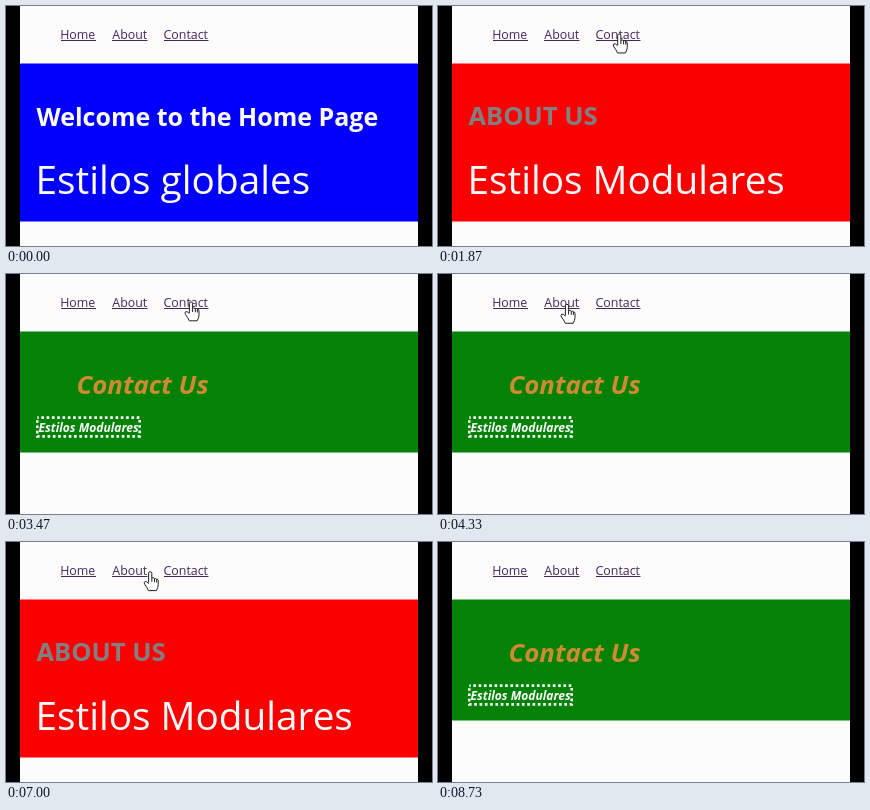
Write an HTML page that moves like this. It is 426 px wide and 240 px high and loops after 8.79 s.

```html
<!DOCTYPE html>
<html lang="en">
<head>
<meta charset="utf-8">
<title>Page styles</title>
<style>
  html, body { margin: 0; width: 100%; height: 100%; overflow: hidden; background: #000; }
  svg { display: block; width: 100vw; height: 100vh; }
  text { font-family: "Open Sans", "Noto Sans", sans-serif; white-space: pre; }
  .nav text { font-size: 12.4px; fill: #46265c; }
  .nav path { stroke: #46265c; }
  .page { visibility: hidden; fill: #fdfdfd; }
  .title { font-size: 25px; font-weight: 700; }
  .lead { font-size: 38.7px; }
  .italic { font-style: italic; font-weight: 700; }
  #home rect { fill: #0000fc; }
  #about rect { fill: #fc0000; }
  #about .title { font-size: 25.5px; fill: #808080; }
  #contact .panel { fill: #048208; }
  #contact .title { font-size: 25.8px; fill: #cf8a32; }
  #contact .note { font-size: 12.05px; }
  #contact .dots { fill: none; stroke: #fdfdfd; stroke-width: 2.6; stroke-dasharray: 2.65; stroke-dashoffset: 1.3; }
</style>
</head>
<body>
<svg viewBox="0 0 426 240">
  <rect width="426" height="240"/>
  <rect x="14" width="398" height="240" fill="#fcfcfd"/>

  <g class="nav">
    <text x="54.2" y="33">Home</text>
    <text x="106.3" y="33">About</text>
    <text x="157.5" y="33">Contact</text>
    <path d="M55 34.5H90M106 34.5H141.5M158 34.5H202.5"/>
  </g>

  <g class="page" id="home">
    <rect x="14" y="57.5" width="398" height="158"/>
    <text class="title" x="30.5" y="120">Welcome to the Home Page</text>
    <text class="lead" x="29.5" y="188">Estilos globales</text>
  </g>

  <g class="page" id="about">
    <rect x="14" y="57.5" width="398" height="158"/>
    <text class="title" x="30.5" y="119.3">ABOUT US</text>
    <text class="lead" x="29.5" y="188">Estilos Modulares</text>
  </g>

  <g class="page" id="contact">
    <rect class="panel" x="14" y="57.5" width="398" height="121"/>
    <text class="title italic" x="70.5" y="119.5">Contact Us</text>
    <rect class="dots" x="31.3" y="143.6" width="102.4" height="18.8"/>
    <text class="note italic" x="32.5" y="157.8">Estilos Modulares</text>
  </g>

  <path id="hand" fill="#fff" stroke="#222" stroke-linejoin="round"
        d="M-1.6 11.5V1.7Q-1.6 .4 0 .4T1.6 1.7V6.7Q3 5.5 4.3 7.3Q5.6 6.4 6.4 8Q8 7.5 8 9.4V13.5Q8 16 6.2 19.3H-1.7Q-3.2 16-5.5 13Q-6.6 11-5.3 10.2T-1.6 12.2M1.6 6.7V10.5M4.3 7.3V10.8M6.4 8V11"/>
</svg>
<script>
const LOOP = 8790;
const BEAT = 1080;        // time between clicks
const FIRST_BEAT = 120;

const route = ["home", "about", "contact", "contact", "about", "home", "about", "contact"];
const links = {           // where the fingertip rests
  home: { x: 65, y: 36 },
  about: { x: 129, y: 30 },
  contact: { x: 185, y: 27.5 }
};

const hand = document.getElementById("hand");
const pages = document.querySelectorAll(".page");
const clamp = (value, low, high) => Math.min(high, Math.max(low, value));
const ease = u => u * u * (3 - 2 * u);
const mix = (a, b, u) => a + (b - a) * u;

function draw(time) {
  const beats = Math.max(0, (time - FIRST_BEAT) / BEAT);
  const visit = Math.min(Math.floor(beats), route.length - 1);
  const current = route[visit];
  for (const page of pages)
    page.style.visibility = page.id === current ? "visible" : "hidden";

  // Rest after a click, glide to the next link, then rest until the next click
  const from = links[current];
  const to = links[route[visit + 1] ?? current];
  const u = ease(clamp((beats - visit - 0.2) / 0.5, 0, 1));
  hand.setAttribute("transform", `translate(${mix(from.x, to.x, u)} ${mix(from.y, to.y, u)})`);
  hand.style.visibility = time > 800 && time < 8250 ? "visible" : "hidden";
}

function tick() {
  draw(performance.now() % LOOP);
  requestAnimationFrame(tick);
}
tick();
</script>
</body>
</html>
```
